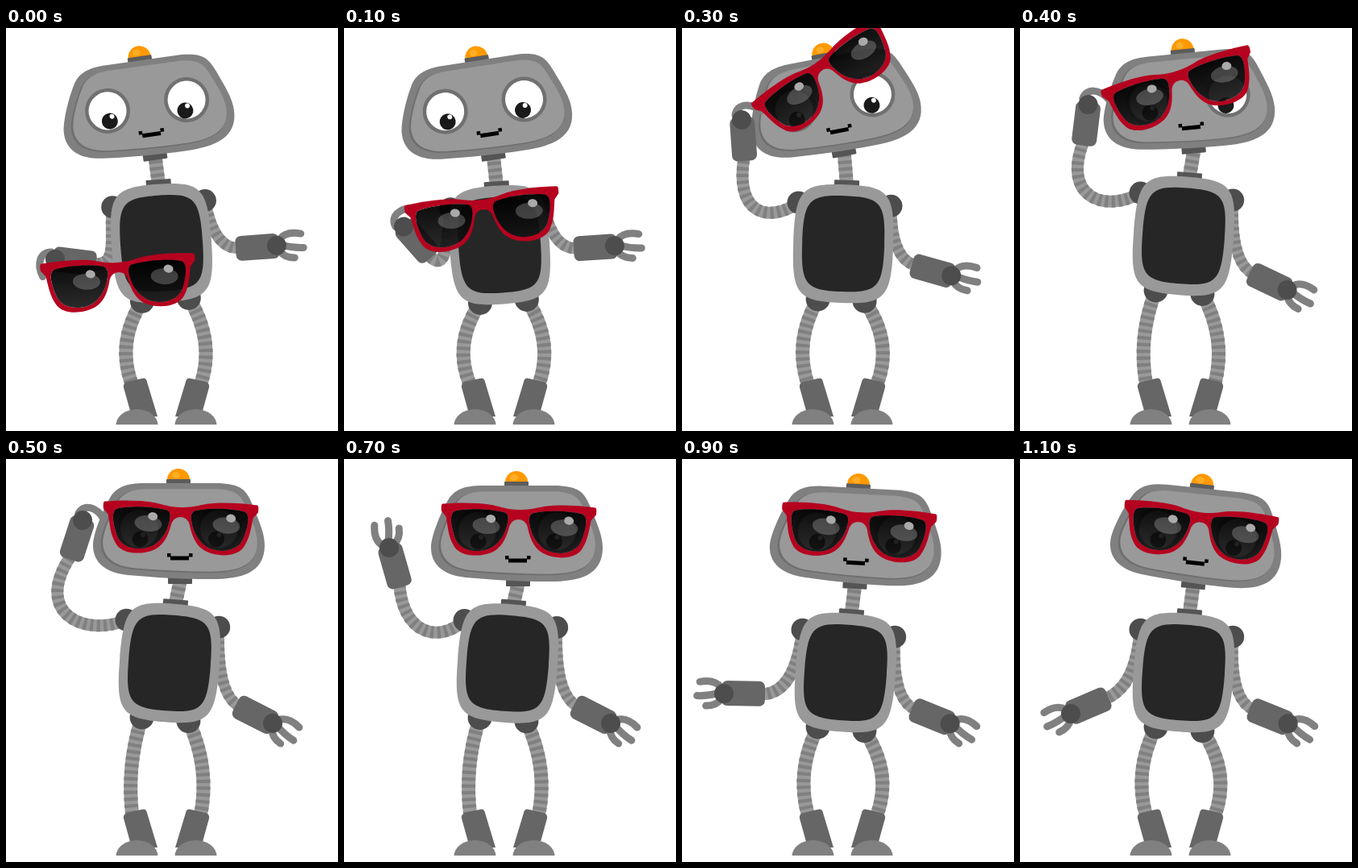
Write an HTML page with a canvas that moves like this. It is 412x500 px and loops after 2.4 s.

```html
<!DOCTYPE html>
<html lang="en">
<head>
<meta charset="utf-8">
<title>Robot puts on sunglasses</title>
<style>
  html, body { margin: 0; width: 100%; height: 100%; overflow: hidden; background: #fff; }
  canvas { display: block; }
</style>
</head>
<body>
<canvas id="stage" width="412" height="500"></canvas>
<script>
const ctx = document.getElementById('stage').getContext('2d');
const LOOP = 2400, STEP = 100, LAST_STEP = 11;
const LIGHT = '#999', MID = '#808080', ARM = '#666', DARK = '#4d4d4d', RED = '#b5031f';
const FOREARM = 46;

const rad = degrees => degrees * Math.PI / 180;

// Eased 0..1 progress of step s between two steps.
function ease(s, from, to) {
  const k = Math.min(1, Math.max(0, (s - from) / (to - from)));
  return k * k * (3 - 2 * k);
}

// Moves a local point into a frame given as [x, y, angle].
function place([x, y, angle], px, py) {
  const c = Math.cos(rad(angle)), s = Math.sin(rad(angle));
  return [x + px * c - py * s, y + px * s + py * c];
}

// Waving wrist: step, x, y, forearm angle.
const wristPath = [
  [0, 61, 287, 187], [2, 87, 206, 270], [3, 74, 114, 266], [5, 95, 76, 288],
  [7, 56, 110, 254], [9, 52, 291, 181], [11, 63, 316, 157]
];

function wristAt(s) {
  const i = Math.max(1, wristPath.findIndex(key => key[0] >= s));
  const [a, b] = [wristPath[i - 1], wristPath[i]];
  const k = (s - a[0]) / (b[0] - a[0]);
  return a.map((v, n) => v + (b[n] - v) * k).slice(1);
}

function poseAt(s) {
  const sway = ease(s, 1.5, 3.8);
  const crouch = ease(s, .5, 2) - ease(s, 2, 3.5);
  const stretch = ease(s, 2.5, 5) - ease(s, 6.5, 9);
  const torso = [193 + 10 * sway, 267 + 8 * crouch - 14 * stretch - 2 * ease(s, 5, 9), -4 + 8.5 * sway];
  const head = [
    181 + 35 * ease(s, 1.8, 4.5) + 2 * ease(s, 9, 11),
    131 - 9 * ease(s, 1.5, 4.5) + 6 * ease(s, 5, 9),
    -8 - 3 * ease(s, 0, 3) + 11 * ease(s, 3, 5) + 6 * ease(s, 7, 11)
  ];

  const drop = ease(s, .8, 4.5), settle = ease(s, 7, 9);
  const rightAngle = -4 + 31 * drop - 5 * settle;
  const rightElbow = [290, 273 + 34 * drop + 4 * settle, rightAngle];
  const right = {
    arm: [...place(rightElbow, FOREARM, 0), rightAngle],
    handAngle: -5 + 35 * ease(s, 2, 5) - 3 * settle, palm: 1, grip: false
  };

  const arm = wristAt(s);
  const left = { arm, handAngle: arm[2] + 4, palm: arm[2] > 225 ? 1 : -1, grip: s < 6 };

  // The glasses hang from the hand until they sit on the head.
  let glasses;
  if (s < 5) {
    const angle = -4 - 6.5 * ease(s, 0, 2) - 24.5 * ease(s, 2, 3) + 36 * ease(s, 3, 5);
    const hinge = place([arm[0], arm[1], left.handAngle], 16, 14 * left.palm);
    glasses = [...place([...hinge, angle], 96, 0), angle];
  } else {
    glasses = [...place(head, 1, -62), head[2] + 1.5 - ease(s, 9, 11)];
  }
  return { torso, head, left, right, glasses };
}

function within([x, y, angle], draw) {
  ctx.save();
  ctx.translate(x, y);
  ctx.rotate(rad(angle));
  draw();
  ctx.restore();
}

function fill(color, path) {
  ctx.fillStyle = color;
  ctx.fill(path);
}

function ellipse(color, x, y, rx, ry = rx, angle = 0) {
  ctx.fillStyle = color;
  ctx.beginPath();
  ctx.ellipse(x, y, rx, ry, angle, 0, Math.PI * 2);
  ctx.fill();
}

function box(color, x, y, w, h, r = 0) {
  ctx.fillStyle = color;
  ctx.beginPath();
  ctx.roundRect(x, y, w, h, r);
  ctx.fill();
}

// Soft rectangle with slightly bulging sides.
function cushion(color, w, h, k = .88) {
  ctx.fillStyle = color;
  ctx.beginPath();
  ctx.moveTo(0, -h);
  ctx.bezierCurveTo(k * w, -h, w, -k * h, w, 0);
  ctx.bezierCurveTo(w, k * h, k * w, h, 0, h);
  ctx.bezierCurveTo(-k * w, h, -w, k * h, -w, 0);
  ctx.bezierCurveTo(-w, -k * h, -k * w, -h, 0, -h);
  ctx.fill();
}

// Line, quadratic or cubic, depending on the number of points.
function curve(start, ...rest) {
  ctx.beginPath();
  ctx.moveTo(...start);
  const draw = [ctx.lineTo, ctx.quadraticCurveTo, ctx.bezierCurveTo][rest.length - 1];
  draw.apply(ctx, rest.flat());
}

function tube(width, ...points) {
  curve(...points);
  ctx.lineWidth = width;
  ctx.lineCap = 'butt';
  ctx.strokeStyle = LIGHT;
  ctx.stroke();
  ctx.setLineDash([4.2, 4.2]);
  ctx.strokeStyle = MID;
  ctx.stroke();
  ctx.setLineDash([]);
}

function finger(...points) {
  curve(...points);
  ctx.lineWidth = 9;
  ctx.lineCap = 'round';
  ctx.strokeStyle = MID;
  ctx.stroke();
}

function drawForearm({ arm, handAngle, palm, grip }) {
  within([arm[0], arm[1], handAngle], () => {
    ctx.scale(1, palm);
    if (grip) {
      finger([6, -8], [20, -6], [22, 10], [11, 24]);
    } else {
      finger([4, -7], [13, -17], [31, -12]);
      finger([6, 0], [20, 5], [33, 5.5]);
      finger([2, 6], [8, 16], [21, 17]);
    }
  });
  within(arm, () => {
    box(ARM, -51, -15, 54, 31, 7);
    ellipse(DARK, 0, 0, 12);
  });
}

const headShape = new Path2D(`M-45-92H50C75-90 82-85 90-65C98-45 105-30 105-15
  C105 20 75 27 40 27C0 27-30 25-65 22C-100 18-108 0-108-15
  C-108-30-95-60-88-72C-80-88-65-92-45-92Z`);
const halfFrame = new Path2D(`M-.5 0C15 0 22-3 32-5C52-8 75-7 95-5Q97-4 96 4L90 11
  C87 28 86 36 80 46C73 60 47 61 31 53C18 46 14 32 11 20Q8 12-.5 12Z`);
const lens = new Path2D(`M17 4C35-1 70 0 80 4C87 8 83 25 78 38
  C71 54 47 56 33 48C20 40 14 25 13 12Q13 6 17 4Z`);

function insetHead(color, dx, dy, sx, sy) {
  ctx.save();
  ctx.translate(-1.5 + dx, -32.5 + dy);
  ctx.scale(sx, sy);
  ctx.translate(1.5, 32.5);
  fill(color, headShape);
  ctx.restore();
}

function drawEye(x, pupilX) {
  ellipse('#707070', x, -35.5, 28);
  ellipse('#fff', x, -35.5, 23.5);
  ellipse('#1a1a1a', pupilX, -22.5, 10);
  ellipse('#fff', pupilX + 3.5, -28, 3);
}

function drawHead() {
  box('#555', -15, 25, 30, 8, 1);
  ellipse('#f90', -2, -96, 14);
  ellipse('#ffad26', -5, -102, 5, 4);
  box('#5c5c5c', -17, -97, 30, 7, 1);
  fill(MID, headShape);
  insetHead('#6e6e6e', 0, 0, .91, .87);
  insetHead(LIGHT, 1.5, -1, .9, .86);
  drawEye(-50.5, -49.5);
  drawEye(48.5, 45);
  box('#000', -12, -1.5, 23, 5);
  box('#000', -16, -5, 4.5, 4.5);
  box('#000', 11, -5, 4.5, 4.5);
}

function drawGlasses() {
  const shade = ctx.createLinearGradient(0, 0, 0, 54);
  shade.addColorStop(0, 'rgba(0,0,0,.95)');
  shade.addColorStop(1, 'rgba(20,20,20,.9)');
  // The lens opening is cut out so that the face shows through.
  const rim = new Path2D(halfFrame);
  rim.addPath(lens);
  for (const side of [-1, 1]) {
    ctx.save();
    ctx.scale(side, 1);
    ctx.fillStyle = RED;
    ctx.fill(rim, 'evenodd');
    fill(shade, lens);
    ctx.restore();
  }
  for (const x of [-40, 57]) {
    ellipse('rgba(255,255,255,.22)', x, 21, 17, 10, .1);
    ellipse('#aaa', x + 5.5, 12, 6, 5, .2);
  }
}

function drawTorso() {
  box('#555', -14, -79, 31, 9, 1);
  cushion(LIGHT, 62, 73.5);
  cushion('#262626', 51, 59.5);
}

function drawLeg(side, torso) {
  const hip = place(torso, side * 29, 70);
  const ankle = [199 + side * 42, 444];
  const knee = 199 + side * (51 - (343 - hip[1]) * .35);
  tube(17, hip, [2 * knee - (hip[0] + ankle[0]) / 2, (hip[1] + ankle[1]) / 2], ankle);
  ellipse(DARK, ...hip, 15);

  ctx.save();
  ctx.translate(199, 0);
  ctx.scale(side, 1);
  fill(ARM, new Path2D('M24 439Q25 433 31 435L49 439Q54 441 53 446L43 482H11Z'));
  ellipse(MID, 36.5, 493, 26, 20);
  ctx.restore();
}

function drawUpperArms(torso, left, right) {
  const [ls, rs] = [-57.5, 57.5].map(x => place(torso, x, -49));
  const leftElbow = place(left.arm, -FOREARM, 0);
  // A raised elbow makes the hose sag outwards.
  const lift = Math.max(0, ls[1] - leftElbow[1]);
  tube(15, ls, [ls[0] - 4 - .6 * lift, ls[1] + 38 - .2 * lift],
    place(left.arm, -FOREARM - 35 - .6 * lift, -.3 * lift), leftElbow);
  tube(14, rs, place(right.arm, -FOREARM - 32, 0), place(right.arm, -FOREARM, 0));
  ellipse(DARK, ...ls, 14);
  ellipse(DARK, ...rs, 14);
}

function draw({ torso, head, left, right, glasses }) {
  ctx.clearRect(0, 0, 412, 500);
  ctx.save();
  ctx.beginPath();
  ctx.rect(0, 0, 412, 492);
  ctx.clip();
  drawLeg(-1, torso);
  drawLeg(1, torso);
  drawUpperArms(torso, left, right);
  tube(17, place(torso, 1.5, -74), place(head, 0, 30));
  within(torso, drawTorso);
  within(head, drawHead);
  drawForearm(right);
  drawForearm(left);
  within(glasses, drawGlasses);
  ctx.restore();
}

const start = performance.now();
function frame() {
  const time = (performance.now() - start) % LOOP;
  draw(poseAt(Math.min(LAST_STEP, Math.floor(time / STEP))));
  requestAnimationFrame(frame);
}
frame();
</script>
</body>
</html>
```
